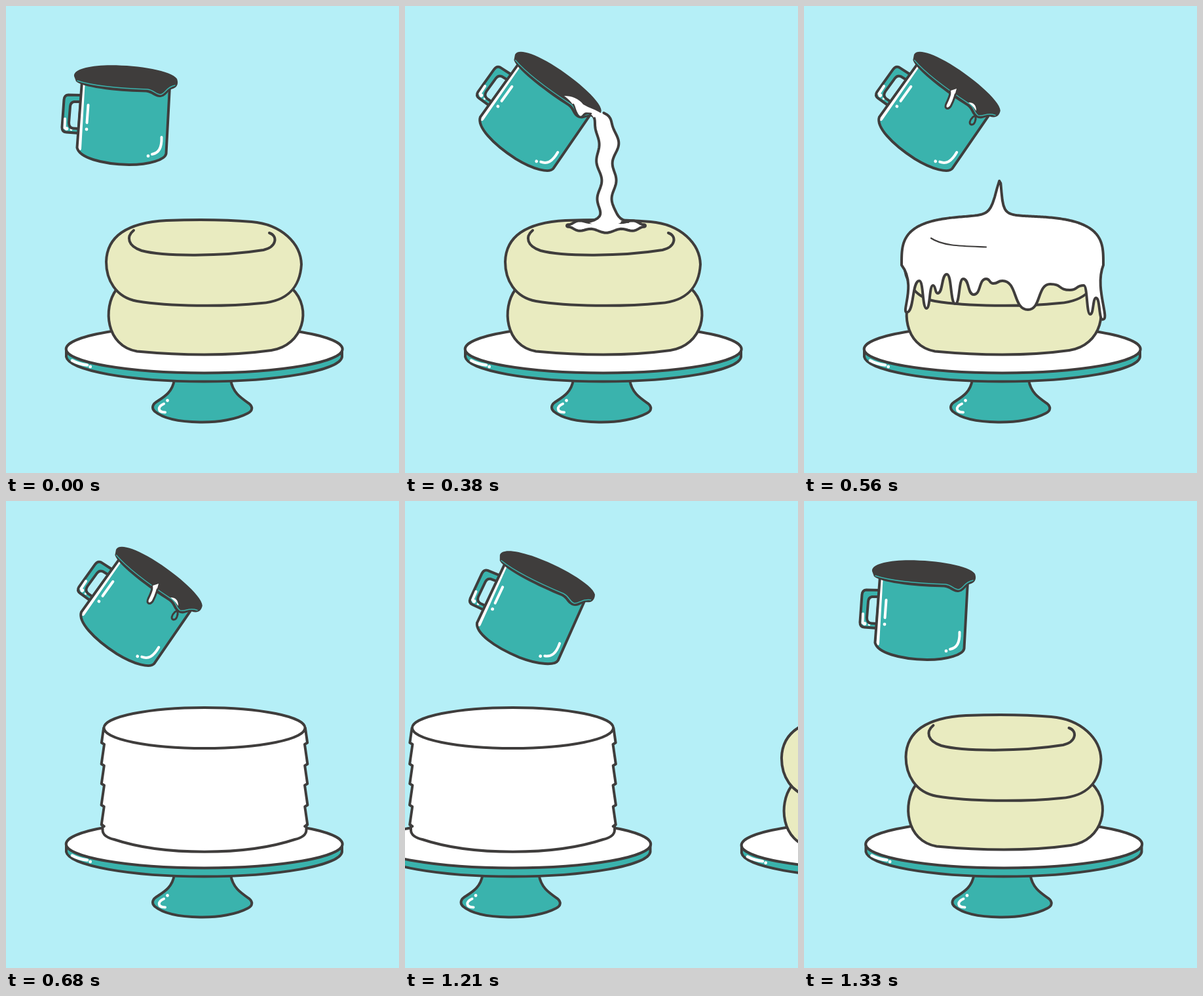
Write an HTML page with a canvas that moves like this. It is 600 by 712 pixels and loops after 1360 ms.

```html
<!DOCTYPE html>
<html lang="en">
<head>
<meta charset="utf-8">
<title>Icing a cake</title>
<style>
  html, body { margin: 0; width: 100%; height: 100%; overflow: hidden; background: #b5eff7; }
  canvas { display: block; width: 600px; height: 712px; }
</style>
</head>
<body>
<canvas id="stage" width="600" height="712"></canvas>
<script>
const ctx = document.getElementById('stage').getContext('2d');
const SKY = '#b5eff7', INK = '#3f3d3c', TEAL = '#3ab3ad', SPONGE = '#e9ebc0', WHITE = '#fff';
const LOOP = 1360, STEP = 30, MID = 303;

const toPath = p => typeof p === 'string' ? new Path2D(p) : p;
function fill(p, color) { ctx.fillStyle = color; ctx.fill(toPath(p)); }
function line(p, width = 4, color = INK) {
  ctx.lineWidth = width;
  ctx.strokeStyle = color;
  ctx.stroke(toPath(p));
}
function shape(p, color, width = 4) { fill(p, color); line(p, width); }

function ellipse(x, y, rx, ry = rx) {
  const path = new Path2D();
  path.ellipse(x, y, rx, ry, 0, 0, 7);
  return path;
}
const dot = (x, y, r = 2.4) => fill(ellipse(x, y, r), WHITE);

// Polyline through count + 1 samples of f(0..1)
function plot(f, count = 60) {
  const path = new Path2D();
  for (let i = 0; i <= count; i++) path.lineTo(...f(i / count));
  return path;
}

function drawStand() {
  shape('M257 570 C254 588 243 595 232 602 C223 607 222 613 227 618 C240 629 265 634 296 634.5 C325 635 352 630 369 621 C377 617 377 611 371 606 C358 597 346 589 343 570Z', TEAL);
  line('M241 606.5 C231 611 231 619 243 619.5', 4, WHITE);
  dot(246.5, 601.5);
  shape('M92 523 V535 C96 556 190 572.5 302 572.5 C414 572.5 510 556 513 535 V523Z', TEAL);
  line('M101 540.5 Q111 546 124 547.5', 4.5, WHITE);
  dot(128.7, 550);
  shape(ellipse(302.7, 523, 211, 36.5), WHITE);
}

function drawSponge() {
  shape('M168 433 C148 460 152 518 200 526.5 C270 533 340 534 405 525 C454 518 468 461 437 431Z', SPONGE);
  shape('M200 450 C167 444 153 417 153 390 C154 348 190 330 245 327 C290 325.5 340 326 375 329 C421 333 450 362 451 394 C449 428 430 450 390 453 C330 459 250 458 200 450Z', SPONGE);
  line('M195 342 C183 352 186 366 207 373 C240 382 330 382 393 372 C414 367 415 350 402 346');
}

function drawCake() {
  // Ragged sides: a sawtooth mirrored about the middle
  const side = sign => u => {
    const y = 346 + 150 * u;
    return [MID + sign * (153 + 4.5 * (((y - 340) / 31) % 1)), y];
  };
  const left = side(-1), right = side(1), body = plot(u => left(1 - u));
  body.addPath(plot(right));
  body.addPath(new Path2D('M147.5 494 V502 Q148 512 165 516 C240 541 366 541 441 516 Q458 512 458.5 502 V494'));
  fill('M149 346 L147 500 Q148 512 165 516 C240 541 366 541 441 516 Q458 512 459 500 L457 346Z', WHITE);
  line(body);
  shape(ellipse(MID, 346, 153.5, 31), WHITE);
}

// Turning points of the icing's lower edge, right to left: tip, gap, tip, ...
const DRIPS = [[456, 478], [446, 445], [437, 470], [427, 426], [406, 433], [376, 424],
  [342, 463], [303, 419], [289, 423], [278, 416], [259, 440], [243, 416], [231, 454],
  [218, 409], [204, 438], [197, 426], [187, 461], [176, 419], [157, 467]];

function icing(size, sink, peak) {
  const path = plot(u => {
    const v = -Math.cos(u * Math.PI), x = MID + 154 * v;
    const tip = peak * 55 / (1 + ((x - 294) / 6) ** 2);
    return [x + 0.09 * tip, 395 - 74 * Math.max(0, 1 - Math.abs(v) ** 3.4) ** (1 / 3.4) - tip];
  }, 200);
  const keys = DRIPS.map(([x, y]) => {
    const floor = 500 + 36 * Math.sqrt(1 - ((x - MID) / 156) ** 2);
    return [x, y + sink * (floor - y)];
  });
  let [x, y] = keys[0];
  path.bezierCurveTo(443, 430, x + 12, y, x, y);
  for (const [nx, ny] of keys.slice(1)) {
    const bend = 0.6 * (nx - x);
    path.bezierCurveTo(x + bend, y, nx - bend, ny, nx, ny);
    [x, y] = [nx, ny];
  }
  path.bezierCurveTo(x - 9, y, 172, 425, 149, 395);
  path.closePath();
  const scaled = new Path2D();
  scaled.addPath(path, new DOMMatrix([size, 0, 0, size, 304 * (1 - size), 332 * (1 - size)]));
  return scaled;
}

function drawPool() {
  shape(plot(u => {
    const a = u * 2 * Math.PI;
    return [307 + 60 * Math.cos(a), 335 + 8 * Math.sin(a) * (1 + 0.35 * Math.cos(8 * a))];
  }, 90), WHITE);
}

// A wobbling ribbon that ends in a round tip, or flares out where it lands
function drawStream(end, landed) {
  const edge = sign => u => {
    const y = 163 + (end - 163) * u;
    const mid = 308 - 18 * Math.exp((163 - y) / 7) + 3.5 * Math.cos((y - 210) / 56 * 2 * Math.PI);
    let half = 11 + 4 * Math.exp(-(((y - 205) / 30) ** 2));
    if (landed) half += 19 * Math.exp((y - end) / 5);
    else half *= Math.min(1, Math.sqrt((end - y) / 14));
    return [mid + sign * half, y];
  };
  const left = edge(-1), right = edge(1);
  fill(plot(u => u < 0.5 ? left(2 * u) : right(2 - 2 * u), 121), WHITE);
  if (landed) fill(ellipse(305, end, 25, 5), WHITE);
  line(plot(left));
  line(plot(right));
  fill('M243 137 C255 137 265 141 272 150 C282 156 292 158 300 164 L288 170 C283 161 273 159 270 168 C263 170 262 150 243 137Z', WHITE);
  line('M257 150 C261 157 260 166 267 169 C272 170 272 162 284 164', 2.5);
}

function drawMug(tilt) {
  ctx.save();
  ctx.translate(180 + 22.5 * tilt, 165 - 1.8 * tilt);
  ctx.rotate(tilt * 31.5 * Math.PI / 180);
  ctx.translate(-180, -165);
  shape('M116 136 L95 135.5 Q89 136 88.5 143 L85.5 185 Q85.5 192 92 192.5 L112 194Z', TEAL);
  line('M90 172 L89.5 186', 4, WHITE);
  dot(92.5, 187, 2.8);
  dot(99.5, 188.5, 1.8);
  shape('M114 146 L104 146 Q98.5 147 98 153 L96 178 Q96 186 103 186.5 L111 187Z', SKY);
  const body = 'M116 115 L108.5 216 C112 231 145 241 188 242 C220 242 243 234 244.5 225 L250 122Z';
  fill(body, TEAL);
  line('M117.5 120 L112 217', 6, WHITE);
  line(body);
  line('M125.5 151 L123.5 178', 4, WHITE);
  dot(123, 188);
  line('M237.5 200 C238 217 233 224 223 226', 4, WHITE);
  dot(217, 228.7);
  fill('M104 107 C103 98 120 92 150 90.5 C195 89 252 98 261 111 C264 119 261 125 252 127 C247 129 245 139 234 139 C225 138 224 133 214 131.5 C180 131 120 126 107 115Z', INK);
  line('M109 114 C140 124 185 126 216 127 C226 128 228 135 236 135 C244 133 244 124 258 121', 1.5, TEAL);
  ctx.restore();
}

function drawDrips() {
  shape('M224 129 L233 126 C231 140 227 147 224 153 C219 159 214 156 217 149 C221 141 223 136 224 129Z', WHITE, 3);
  fill('M224 129 L233 126 L231 133 L225 138Z', WHITE);
  fill('M251 147 C259 147 263 151 263 160 C259 154 256 151 251 147Z', WHITE);
  shape('M262 167 C263 175 260 181 256 181 C251 180 253 174 258 169Z', TEAL, 3);
}

function drawPour(n) {
  const pouring = n >= 4 && n < 12, landed = n >= 7;
  drawStand();
  if (n >= 17) drawCake();
  else {
    drawSponge();
    if (n === 7) drawPool();
    if (n > 7) {
      const size = 1 - 0.45 * (Math.max(0, 13 - n) / 5) ** 1.5;
      const sink = Math.max(0, n - 13) * 0.3;
      const peak = pouring ? 0 : n < 13 ? 2.1 : 1 - sink;
      shape(icing(size, sink, peak), WHITE);
      if (!pouring) line('M194 354 C212 366 240 366 278 367.5', 2.2);
    }
  }
  drawMug(Math.min(1, n / 4));
  if (pouring) drawStream(landed ? 329 : 210 + 50 * (n - 4), landed);
  else if (landed) drawDrips();
}

function shifted(x, y, ...parts) {
  ctx.save();
  ctx.translate(x, y);
  parts.forEach(part => part());
  ctx.restore();
}

// Both stands speed up to the left while the mug swings back
function drawSlide(k) {
  shifted(-52.75 * k - 8.25 * k * k, 0, drawStand, drawCake);
  shifted(543.2 - 45.9 * k - 7.37 * k * k, 2 * Math.sin(k * Math.PI / 6), drawStand, drawSponge);
  drawMug(Math.max(0, 1 - (k - 1) / 3));
}

function draw(t) {
  ctx.fillStyle = SKY;
  ctx.fillRect(0, 0, 600, 712);
  ctx.lineCap = ctx.lineJoin = 'round';
  const step = from => Math.floor((t - from) / STEP) + 1;
  if (t >= 1180) drawSlide(Math.min(6, step(1180)));
  else drawPour(Math.max(0, Math.min(17, step(200))));
}

const start = performance.now();
function tick() {
  draw((performance.now() - start) % LOOP);
  requestAnimationFrame(tick);
}
tick();
</script>
</body>
</html>
```
